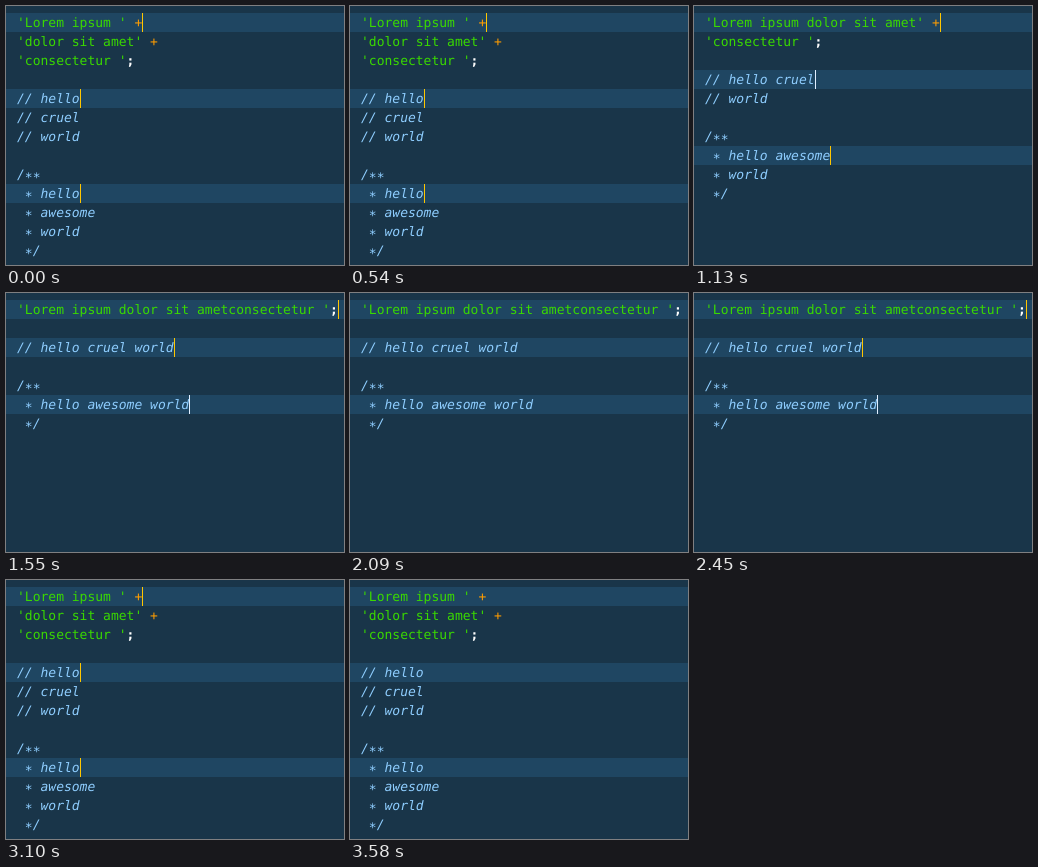
Animation, 338 px wide and 259 px high, one loop 3.94 s. Source, as an HTML page with a canvas:

```html
<!DOCTYPE html>
<html lang="en">
<head>
<meta charset="utf-8">
<title>Joining lines</title>
<style>
  html, body { margin: 0; width: 100%; height: 100%; overflow: hidden; background: #193549; }
  canvas { display: block; }
</style>
</head>
<body>
<canvas id="stage" width="338" height="259"></canvas>
<script>
const ctx = document.getElementById('stage').getContext('2d');

const LOOP = 3940;
const FONT_SIZE = 13;
const CELL = FONT_SIZE * 0.60205;
const LEFT = 11;
const TOP = 7;
const LINE = 19;
const BASELINE = 14;
const STAR_DROP = 2.5;

const COLORS = {
  back: '#193549', active: '#1f4662', string: '#3ad900', operator: '#ff9d00',
  plain: '#ffffff', comment: '#8fceff', caret: '#ffc600', paleCaret: '#e1efff'
};

// carets: rows holding a caret at the end of the line; pale: rows with a lighter one
const separate = {
  lines: ["'Lorem ipsum ' +", "'dolor sit amet' +", "'consectetur ';", '',
          '// hello', '// cruel', '// world', '',
          '/**', ' * hello', ' * awesome', ' * world', ' */'],
  carets: [0, 4, 9], pale: []
};
const partial = {
  lines: ["'Lorem ipsum dolor sit amet' +", "'consectetur ';", '',
          '// hello cruel', '// world', '',
          '/**', ' * hello awesome', ' * world', ' */'],
  carets: [0, 3, 7], pale: [3]
};
const joined = {
  lines: ["'Lorem ipsum dolor sit ametconsectetur ';", '',
          '// hello cruel world', '',
          '/**', ' * hello awesome world', ' */'],
  carets: [0, 2, 5], pale: [5]
};

// [start in ms, text, caret visible]
const timeline = [
  [0, separate, true], [120, separate, false], [540, separate, true], [890, separate, false],
  [1130, partial, true],
  [1550, joined, true], [2090, joined, false], [2450, joined, true],
  [2690, partial, true],
  [3100, separate, true], [3580, separate, false]
];

const columnX = column => LEFT + column * CELL;

function drawText(text, column, y, color, style = '') {
  ctx.font = `${style} ${FONT_SIZE}px "DejaVu Sans Mono", monospace`;
  ctx.fillStyle = color;
  ctx.fillText(text, columnX(column), y);
}

function drawLine(line, y) {
  const isString = line.startsWith("'");
  const tokens = isString ? /'[^']*'|\+|;/g : /\*|[^*\s]+/g;
  for (const { 0: token, index } of line.matchAll(tokens)) {
    if (!isString) {
      drawText(token, index, token === '*' ? y + STAR_DROP : y, COLORS.comment, 'italic');
    } else if (token === ';') {
      drawText(token, index, y, COLORS.plain, 'bold');
    } else {
      drawText(token, index, y, token === '+' ? COLORS.operator : COLORS.string);
    }
  }
}

function drawEditor({ lines, carets, pale }, caretVisible) {
  ctx.fillStyle = COLORS.back;
  ctx.fillRect(0, 0, 338, 259);
  lines.forEach((line, row) => {
    const y = TOP + row * LINE;
    const active = carets.includes(row);
    if (active) {
      ctx.fillStyle = COLORS.active;
      ctx.fillRect(0, y, 338, LINE);
    }
    drawLine(line, y + BASELINE);
    if (active && caretVisible) {
      ctx.fillStyle = pale.includes(row) ? COLORS.paleCaret : COLORS.caret;
      ctx.fillRect(Math.round(columnX(line.length)), y, 1, LINE);
    }
  });
}

function render() {
  const time = performance.now() % LOOP;
  const [, text, caretVisible] = timeline.findLast(([start]) => start <= time);
  drawEditor(text, caretVisible);
  requestAnimationFrame(render);
}

ctx.textBaseline = 'alphabetic';
ctx.textRendering = 'geometricPrecision';
render();
</script>
</body>
</html>
```
